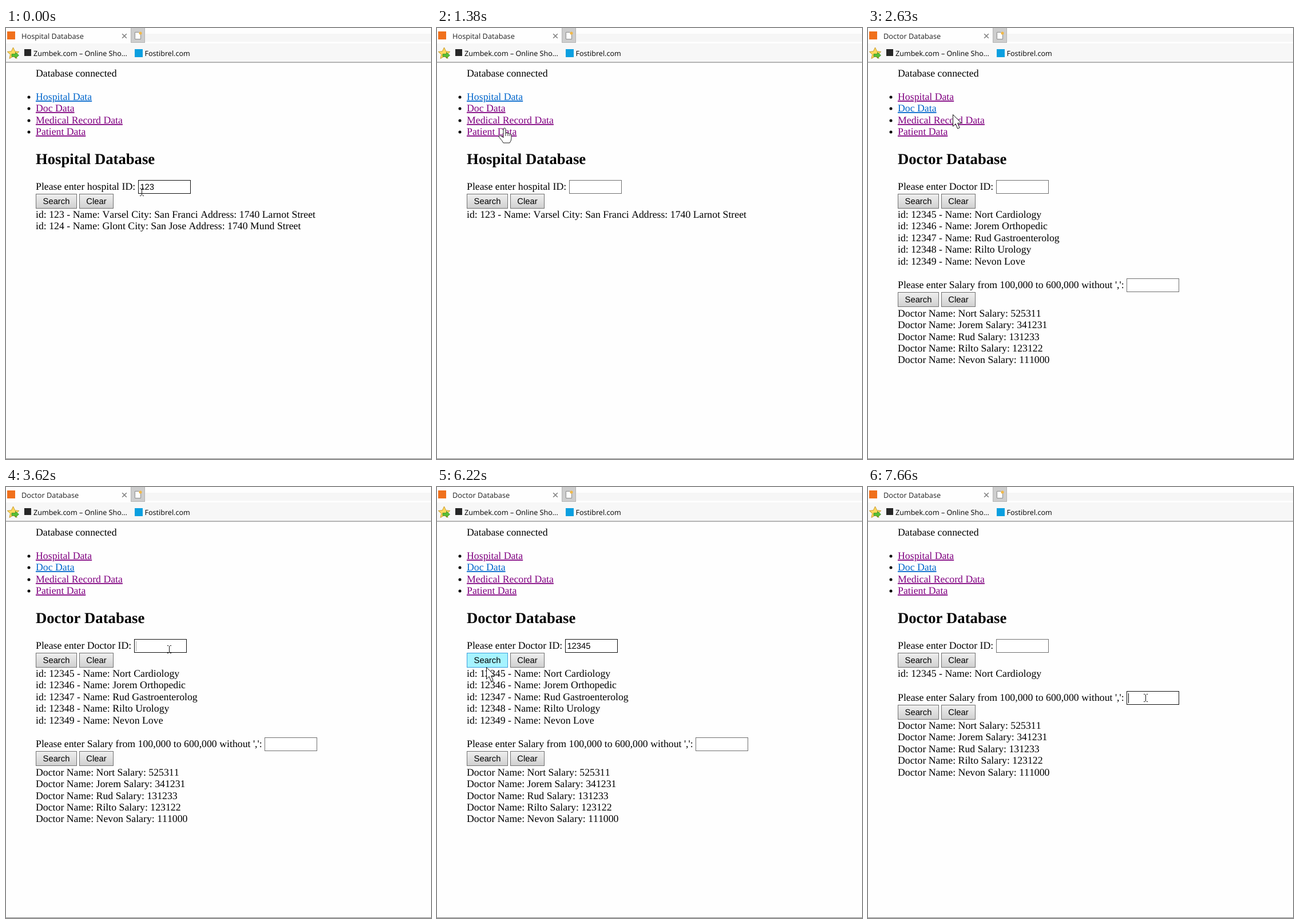
Recreate the animation shown at these times as an HTML page. Size 743 px wide and 754 px high, loop 8 s.

```html
<!DOCTYPE html>
<html lang="en">
<head>
<meta charset="utf-8">
<title>Hospital Database</title>
<style>
html, body { margin: 0; width: 100%; height: 100%; overflow: hidden; background: #fefefe; }
svg { display: block; width: 100%; height: 100%; }
text { font: 17.78px "Liberation Serif", "Times New Roman", serif; font-kerning: none; text-rendering: geometricPrecision; white-space: pre; }
.title { font-size: 26.67px; font-weight: bold; }
.ui { font: 14.81px "Liberation Sans", Arial, sans-serif; }
.tab { font: 12.8px "Open Sans", "Noto Sans", sans-serif; }
.mark { font: 12.6px "Open Sans", "Noto Sans", sans-serif; }
.link { text-decoration: underline; text-decoration-skip-ink: none; }
</style>
</head>
<body>
<svg id="stage" viewBox="0 0 743 754" xmlns="http://www.w3.org/2000/svg">
  <defs>
    <linearGradient id="face" x2="0" y2="1">
      <stop offset="0" stop-color="#efefef"/>
      <stop offset="1" stop-color="#d0d0d0"/>
    </linearGradient>
  </defs>
  <rect width="743" height="754" fill="#fefefe"/>

  <!-- browser bars -->
  <rect x="243" y="10" width="500" height="14" fill="#f6f6f6"/>
  <rect y="27" width="743" height="33" fill="#f7f7f7"/>
  <rect y="59.5" width="743" height="1" fill="#6e6e6e"/>
  <rect y="753" width="743" height="1" fill="#8a8a8a"/>
  <rect x="218" width="25" height="26" fill="#cdcdcd"/>
  <path d="M218.5 0V25.5H242.5V0" fill="none" stroke="#b4b4b4"/>
  <path d="M225.5 7.5H232L235.5 11V19.5H225.5Z" fill="#fff" stroke="#8c8c8c"/>
  <circle cx="235" cy="9" r="2.6" fill="#f0b848"/>
  <path d="M203.2 10.2L210.8 17.8M210.8 10.2L203.2 17.8" stroke="#808080" stroke-width="1.6"/>
  <rect id="tabIcon" x="2" y="6" width="14" height="14" fill="#f0701c"/>
  <g id="spinner" fill="none" stroke-width="2.4">
    <circle cx="12" cy="14" r="6.3" stroke="#8f8f8f"/>
    <path d="M12 7.7A6.3 6.3 0 0 0 5.7 14" stroke="#d2d2d2"/>
  </g>
  <text id="tabName" class="tab" x="27" y="18.5" fill="#222"></text>

  <path d="M12.5 34L15.6 40.8L22.8 41.5L17.4 46.3L19 53.5L12.5 49.8L6 53.5L7.6 46.3L2.3 41.5L9.4 40.8Z" fill="#ffd95c" stroke="#c89a2c"/>
  <path d="M10 45.5H16.5V42.5L22.5 47.8L16.5 53V50H10Z" fill="#58c136" stroke="#348b20" stroke-width=".8"/>
  <rect x="32" y="37" width="12" height="12" fill="#262626"/>
  <rect x="225" y="37" width="14" height="14" fill="#0a9fe0"/>
  <text class="mark" x="48" y="48.5">Zumbek.com – Online Sho...</text>
  <text class="mark" x="242.5" y="48.5">Fostibrel.com</text>

  <text x="52" y="85">Database connected</text>
  <g id="links"></g>
  <g id="page"></g>
  <g id="cursor"></g>
</svg>
<script>
const LOOP = 8000, LINE = 20.44, LEFT = 52;
const $ = id => document.getElementById(id);

const people = [
  ["Nort", "Cardiology", 525311],
  ["Jorem", "Orthopedic", 341231],
  ["Rud", "Gastroenterolog", 131233],
  ["Rilto", "Urology", 123122],
  ["Nevon", "Love", 111000]
];
const hospitals = [
  "id: 123 - Name: Varsel City: San Franci Address: 1740 Larnot Street",
  "id: 124 - Name: Glont City: San Jose Address: 1740 Mund Street"
];
const doctors = people.map(([name, field], i) => `id: ${12345 + i} - Name: ${name} ${field}`);
const salaries = people.map(([name, , pay]) => `Doctor Name: ${name} Salary: ${pay}`);
const menu = ["Hospital Data", "Doc Data", "Medical Record Data", "Patient Data"];

const shapes = {
  arrow: '<path d="M.5 .5V21L5.2 16.6L8.6 25L12.2 23.5L8.7 15.4H15.3Z" fill="#fff" stroke="#111"/>',
  beam: '<path d="M-3 -6.5H-1M2 -6.5H4M.5 -6V6M-3 6.5H-1M2 6.5H4" fill="none" stroke="#111"/>',
  hand: '<path d="M-2 2Q-2 0 0 0Q2 0 2 2V9Q4 7 6 9.5Q8 8 9.3 10.5Q12 9.5 12 13V18Q12 22 9 26H-2Q-4 22 -9.5 16Q-11 13.5 -8 13Q-5 13.5 -2 17Z" fill="#fff" stroke="#222"/>' +
        '<path d="M2 9V14M6 10V14M9.3 11V14" stroke="#222" fill="none"/>'
};

// Each cursor pose holds until the next one: time, x, y, shape
const path = [
  [0, 237, 287, "beam"], [160, 205, 294, "arrow"], [300, 130, 299, "arrow"], [430, 85, 299, "arrow"],
  [1250, 112, 234, "arrow"], [1380, 118, 175, "hand"], [1520, 104, 152, "hand"], [1650, 100, 133, "hand"],
  [2490, 116, 136, "arrow"], [2630, 148, 151, "arrow"], [2780, 232, 226, "arrow"], [2900, 284, 288, "beam"],
  [3050, 285, 284, "beam"],
  [5400, 340, 340, "arrow"], [5540, 450, 440, "arrow"], [5680, 492, 473, "arrow"], [5820, 360, 430, "arrow"],
  [5960, 210, 370, "arrow"], [6090, 120, 334, "arrow"], [6220, 86, 315, "arrow"], [6370, 86, 304, "arrow"],
  [6870, 120, 318, "arrow"], [7000, 215, 340, "arrow"], [7130, 340, 362, "arrow"], [7260, 440, 378, "arrow"],
  [7390, 486, 386, "arrow"], [7540, 485, 369, "beam"]
];
const typing = [[0, ""], [3950, "12"], [4140, "123"], [4420, "1234"], [4570, "12345"]];
const caretTimes = [[0, ""], [3200, "#000"], [3620, "#aaa"], [3740, ""], [3950, "#000"],
  [4970, "#aaa"], [5120, ""], [5400, "#000"], [6090, ""], [7660, "#000"]];

const last = (list, t) => list.filter(k => k[0] <= t).pop();
const between = (t, a, b) => t >= a && t < b;

const text = (x, y, s, cls = "", fill = "#000") =>
  `<text x="${x}" y="${Math.round(y)}" class="${cls}" fill="${fill}">${s}</text>`;
const box = (x, y, w, h, fill, stroke) =>
  `<rect x="${x + .5}" y="${y + .5}" width="${w - 1}" height="${h - 1}" fill="${fill}" stroke="${stroke}"/>`;
const rows = (list, y) => list.map((s, i) => text(LEFT, y + i * LINE, s)).join("");

function button(x, y, w, label, hot) {
  return box(x, y, w, 26, hot ? "#a6f3ff" : "url(#face)", hot ? "#3c9fdc" : "#707070") +
    `<text class="ui" x="${x + w / 2}" y="${y + 18}" text-anchor="middle">${label}</text>`;
}

// Prompt, entry field and its two buttons; y is the top of the field
function form(y, prompt, x, { value = "", focus = false, caret = "", hot = false }) {
  const caretX = Math.floor(x + 3.4 + value.length * 8.237);
  return text(LEFT, y + 17, prompt) +
    box(x, y, 92, 24, "#fff", focus ? "#111" : "#707070") +
    text(x + 3.4, y + 17, value, "ui") +
    (caret && `<rect x="${caretX}" y="${y + 4}" width="1" height="17" fill="${caret}"/>`) +
    button(LEFT, y + 24, 72, "Search", hot) + button(128, y + 24, 60, "Clear", false);
}

function hospitalPage(t) {
  const done = t >= 960;
  return text(LEFT, 238, "Hospital Database", "title") +
    form(266, "Please enter hospital ID:", 231, {
      value: done ? "" : "123", focus: t < 560, hot: between(t, 300, 1250)
    }) +
    rows(done ? hospitals.slice(0, 1) : hospitals, 332);
}

function doctorPage(t) {
  const done = t >= 6740;
  const caret = last(caretTimes, t)[1];
  return text(LEFT, 238, "Doctor Database", "title") +
    form(266, "Please enter Doctor ID:", 224, {
      value: done ? "" : last(typing, t)[1],
      focus: between(t, 3200, 6490), caret: done ? "" : caret, hot: between(t, 6220, 6870)
    }) +
    rows(done ? doctors.slice(0, 1) : doctors, 332) +
    form(done ? 357 : 438, "Please enter Salary from 100,000 to 600,000 without ',':", 452, {
      focus: t >= 7660, caret: done ? caret : ""
    }) +
    rows(salaries, done ? 423 : 504.7);
}

const cache = {};
function put(id, html) {
  if (cache[id] !== html) $(id).innerHTML = cache[id] = html;
}

function draw(t) {
  const doctor = t >= 2220;
  const loading = between(t, 560, 960) || between(t, 1950, 2220) || between(t, 6490, 6740);
  put("tabName", loading ? "localhost" : doctor ? "Doctor Database" : "Hospital Database");
  $("tabIcon").style.display = loading ? "none" : "";
  $("spinner").style.display = loading ? "" : "none";
  $("spinner").setAttribute("transform", `rotate(${Math.floor(t / 130) * 45} 12 14)`);

  put("links", menu.map((name, i) => {
    const y = Math.round(126 + i * LINE);
    return `<circle cx="40" cy="${y - 5}" r="2.5"/>` +
      text(LEFT, y, name, "link", i === +doctor ? "#0066cc" : "#800080");
  }).join(""));
  put("page", doctor ? doctorPage(t) : hospitalPage(t));

  const [, x, y, shape] = last(path, t);
  put("cursor", shapes[shape]);
  $("cursor").setAttribute("transform", `translate(${x} ${y})`);
}

const start = performance.now();
function tick() {
  draw((performance.now() - start) % LOOP);
  requestAnimationFrame(tick);
}
tick();
</script>
</body>
</html>
```
